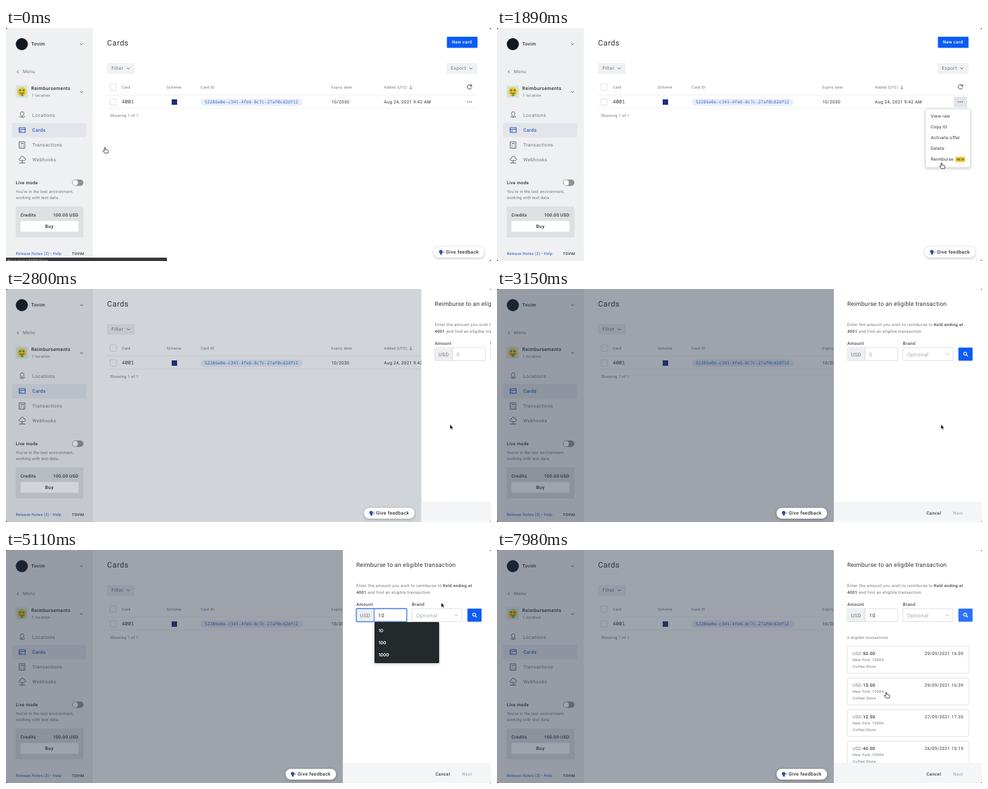
Animation, 720 px wide and 346 px high, one loop 8 s. Source, as an HTML page:

```html
<!DOCTYPE html>
<html lang="en">
<head>
<meta charset="utf-8">
<title>Reimbursement walkthrough</title>
<style>
  html, body { margin: 0; width: 100%; height: 100%; overflow: hidden; background: #111; }
  svg { display: block; width: 100vw; height: 100vh; border-radius: 3px; }
  text { font-family: Roboto, sans-serif; letter-spacing: .05em; text-rendering: geometricPrecision; white-space: pre; }
  .mono { font-family: "Noto Sans Mono", monospace; letter-spacing: 0; }
  .system { font-family: Inter, sans-serif; letter-spacing: 0; }
  .tight { letter-spacing: .03em; }
  .bold { font-weight: 500; }
  .raised { filter: drop-shadow(0 1px 2px rgba(0, 0, 0, .25)); }
  .line { fill: none; stroke-linecap: round; stroke-linejoin: round; }
</style>
</head>
<body>
<svg id="stage" viewBox="0 0 720 346" preserveAspectRatio="none"></svg>
<script>
const LOOP = 8000, STEP = 70, DRAWER = 220;
const INK = '#2d3036', GREY = '#70757d', BLUE = '#0b5cf5', LINK = '#2c5cc5';

// Drawing helpers; a text's y is the middle of its capitals.
const text = (x, y, str, size = 6.5, fill = INK, cls = '', more = '') =>
  `<text x="${x}" y="${y + size * .355}" font-size="${size}" fill="${fill}" class="${cls}" ${more}>${str}</text>`;
const rect = (x, y, w, h, fill, r = 0, more = '') =>
  `<rect x="${x}" y="${y}" width="${w}" height="${h}" rx="${r}" fill="${fill}" ${more}/>`;
const box = (x, y, w, h, r = 1, fill = '#fff', stroke = '#d5d8dc') =>
  rect(x, y, w, h, fill, r, `stroke="${stroke}" stroke-width=".8"`);
const line = (d, stroke = '#555a61', width = .9, more = '') =>
  `<path class="line" d="${d}" stroke="${stroke}" stroke-width="${width}" ${more}/>`;
const circle = (x, y, r, fill, more = '') => `<circle cx="${x}" cy="${y}" r="${r}" fill="${fill}" ${more}/>`;
const group = (id, body, more = '') => `<g id="${id}" ${more}>${body}</g>`;
const chevron = (x, y, color) => line(`M${x - 2} ${y - 1}l2 2 2-2`, color);
const magnifier = id => group(id,
  circle(695, 96, 2.2, 'none', 'stroke="#fff" stroke-width="1.1"') + line('M696.8 97.8l1.9 1.9', '#fff', 1.2));

const navIcons = [
  line('M24 131.5c-4-4-3-7 0-7s4 3 0 7M21 130.500c-4 3 10 3 6 0'),
  line('M19.500 148h9v7h-9zM19.500 150.500h9M21 153h2', LINK, 1.1),
  line('M20 169h8v9.500h-8zM22 171.500h4M22 174h.5M25.500 174h.5M22 176.500h.5M25.500 176.500h.5'),
  line('M21.500 197c-3 0-3-3.500 0-3.500 0-4 5-4 5.500-.5 3 0 2.500 4 0 4zM24 197v3M20 200.500h8'),
];

const sidebar = () => rect(0, 0, 129, 346, '#eff0f1')
  + circle(23.500, 24, 9, '#101820')
  + text(37.500, 24, 'Tovim', 7, INK, 'bold') + chevron(112, 24)
  + line('M18.500 63l-2 2 2 2') + text(25, 65, 'Menu', 6.8, GREY)
  + rect(14.500, 85.500, 18, 18, '#cfe6da', 1)
  + circle(23.500, 94.500, 6.6, '#f7c52e') + circle(21, 92.500, 1.7, '#5d8f3a') + circle(26, 92.500, 1.7, '#5d8f3a')
  + line('M20 96q3.500 2 7 0', '#7a4a12', 1.1) + rect(22, 97, 3.6, 4.200, '#66a349', 1)
  + text(37.500, 90, 'Reimbursements', 7, INK, 'bold') + text(38, 99.500, '1 location', 5.7, GREY)
  + chevron(112, 95)
  + rect(9, 141, 110, 21.500, '#e2e5e9', 2)
  + ['Locations', 'Cards', 'Transactions', 'Webhooks'].map((label, i) =>
      navIcons[i] + text(39, 129.500 + 22 * i, label, 7, i == 1 ? LINK : GREY, i == 1 ? 'bold' : '')).join('')
  + text(14.500, 229.500, 'Live mode', 6.5, INK, 'bold')
  + rect(98, 225, 17, 9.500, '#8f9297', 4.75) + circle(102.800, 229.750, 3.900, '#fff')
  + text(14.500, 243, "You're in the test environment,", 6, GREY, 'tight')
  + text(14.500, 252, 'working with test data.', 6, GREY, 'tight')
  + rect(14.500, 265, 100.500, 46, '#dee0e2', 1)
  + text(21.500, 277.500, 'Credits', 6.5, INK, 'bold')
  + text(107.500, 277.500, '100.00 USD', 6.5, INK, 'bold', 'text-anchor="end"')
  + rect(21.500, 286.500, 86, 16, '#fff', 1) + text(58, 294.500, 'Buy', 7, INK, 'bold')
  + text(14.500, 335, 'Release Notes (3) • Help', 5.9, LINK, 'tight')
  + text(98, 335, 'TOVIM', 5.4, INK, 'bold');

const softButton = (x, w, label, tip) => rect(x, 52, w, 16, '#f0f1f3', 1)
  + text(x + 6.5, 60, label, 7, GREY) + chevron(tip, 60);
const page = () => rect(129, 0, 591, 346, '#fff')
  + text(150, 22, 'Cards', 11.3, INK, '')
  + rect(654.500, 13, 45.500, 16.500, BLUE, 1) + text(662, 21, 'New card', 6.5, '#fff', 'bold')
  + softButton(150, 41, 'Filter', 181.500) + softButton(654, 46, 'Export', 690)
  + [['Card', 172], ['Scheme', 238.500], ['Card ID', 289], ['Expiry date', 483], ['Added (UTC)', 561]]
      .map(([label, x]) => text(x, 88, label, 5.6, GREY)).join('')
  + line('M601 85.500v5M599.300 89l1.700 1.700 1.700-1.700', GREY, .8)
  + line('M690.700 85.500a3.300 3.300 0 1 0 .5 3M691.200 84v2.200h-2.200', INK, .9)
  + rect(150, 99, 550, .7, '#e8eaec') + rect(150, 118.500, 550, .7, '#e8eaec')
  + box(154.500, 83, 9.500, 9.500) + box(154.500, 105, 9.500, 9.500)
  + text(172, 109.500, '4001', 7.5, INK, 'mono')
  + rect(246, 106, 8, 8, '#1c2d7c')
  + rect(289, 105, 151, 10.500, '#e8eef9', 5) + text(295, 110, '52286e0e-c341-4fe6-8c7c-27af0cd2df12', 6.43, '#3566cc', 'mono')
  + text(483, 109.500, '10/2030') + text(561, 109.500, 'Aug 24, 2021 9:42 AM')
  + group('dotsHover', rect(678, 102, 20, 15.500, '#e1e4e8', 1))
  + [685, 687.800, 690.600].map(x => circle(x, 109.700, .75, INK)).join('')
  + text(154.500, 129.500, 'Showing 1 of 1', 5.8, GREY);

const rowMenu = () => group('rowMenu', box(636.500, 120.500, 66, 86.500, 2, '#fff', '#e3e5e8')
  + ['View raw', 'Copy ID', 'Activate offer', 'Delete', 'Reimburse'].map((s, i) => text(644, 131 + 16 * i, s)).join('')
  + rect(680.500, 191, 14.500, 8.300, '#fbd34d', 1) + text(682.300, 195.200, 'NEW', 5, '#55420a', 'bold'), 'class="raised"');

const feedback = () => group('feedback', rect(635, 325, 75, 16, '#fff', 8, 'class="raised"')
  + circle(645.500, 332, 2.6, '#2d4f9e') + rect(644.500, 333, 2.800, 3.500, '#2d4f9e', .5)
  + line('M649 332l1.300-.8M649 333.500h1.300', '#2d4f9e', .7)
  + text(653, 333, 'Give feedback', 7, INK, 'bold'));

const results = () => text(520, 130, '6 eligible transactions', 5.6, GREY)
  + [['50.00', '29/09/2021 16:39'], ['15.00', '29/09/2021 16:39'], ['12.50', '27/09/2021 17:35'], ['40.00', '26/09/2021 10:19']]
    .map(([sum, date], i) => {
      const y = 143 + 47 * i;
      return box(520, y, 180, 40)
        + text(528, y + 10.5, `<tspan fill="${GREY}">USD </tspan><tspan class="bold">${sum}</tspan>`)
        + text(692.500, y + 10.5, date, 6.5, INK, '', 'text-anchor="end"')
        + text(528, y + 20.5, 'New York, 10004', 5.6, GREY) + text(528, y + 30, 'Coffee Store', 5.6, GREY);
    }).join('');

const drawer = () => group('drawer', rect(500, 0, 220, 346, '#fff')
  + text(520, 21.500, 'Reimburse to an eligible transaction', 8.7, INK, 'tight')
  + text(520, 52.500, 'Enter the amount you wish to reimburse to <tspan class="bold" fill="#3c4149">Keld ending at</tspan>', 6.1, GREY)
  + text(520, 62.500, '<tspan class="bold" fill="#3c4149">4001</tspan> and find an eligible transaction.', 6.1, GREY)
  + text(520, 80.500, 'Amount', 6.5, '#4a4f57', 'bold') + text(602.500, 80.500, 'Brand', 6.5, '#4a4f57', 'bold')
  + box(520, 87, 75, 19.500) + rect(520.400, 87.400, 26.200, 18.700, '#edeff1') + line('M546.500 87v19.500', '#d5d8dc', .8)
  + text(525.500, 97, 'USD', 7.5, GREY)
  + group('focusRing', rect(520, 87, 75, 19.500, 'none', 1, 'stroke="#4d82ea" stroke-width="1.4"')
    + line('M546.500 87v19.500', '#4d82ea', 1.200))
  + `<text id="amount" x="552.500" y="99.700" font-size="7.7"></text>`
  + box(602.500, 87, 74.500, 19.500) + text(609, 97, 'Optional', 7.7, '#a0a5ac') + chevron(668.500, 97, '#a0a5ac')
  + `<rect id="searchButton" x="685" y="87" height="19.500" rx="1"/>` + magnifier('searchIcon')
  + group('spinners', line('M520.400 120A6 6 0 0 1 529.400 117', LINK, 1.300, 'id="bigSpinner"')
    + line('M689.200 97.500A3 3 0 0 1 693.700 96', '#fff', .9, 'id="smallSpinner"'))
  + group('results', results())
  + rect(500, 316, 220, 30, '#f4f5f6')
  + text(637.500, 333, 'Cancel', 6.5, '#3c4149', 'bold') + text(677, 333, 'Next', 6.5, '#a9adb3', 'bold')
  + group('suggestions', rect(547, 107, 96, 61, '#24292b', 1.500)
    + ['10', '100', '1000'].map((s, i) => text(553, 120 + 18 * i, s, 6.500, '#fff', 'system', 'font-weight="600"')).join(''), 'class="raised"'));

const pointers = () => group('arrow', '<path d="M0 0v7.300l1.700-1.500 1.200 2.500 1.300-.6-1.200-2.400h2.300z" fill="#111" stroke="#fff" stroke-width=".6"/>')
  + group('hand', '<path d="M-.8 .8q.8-1 1.600 0v2.600l3.400.8q1 .4.800 1.600l-.7 3H-.4l-2.700-3.400q.3-1.200 1.400-.5l.9.7z" fill="#fff" stroke="#222" stroke-width=".8"/>')
  + group('beam', line('M-1.500-4.500q1.500 0 1.500 1v7q0 1-1.500 1M1.500-4.500q-1.500 0-1.500 1M0 3.500q0 1 1.500 1', '#222', .8));

const stage = document.getElementById('stage');
stage.innerHTML = page() + sidebar()
  + group('statusBar', rect(-2, 341, 241, 8, '#37383b', 1.500) + text(2, 345.800, 'devserver:4100/lists', 6.3, '#e8e8e8', 'tight'))
  + rowMenu() + rect(0, 0, 720, 346, '#283448', 0, 'id="shade"') + drawer() + feedback() + pointers();
const part = id => document.getElementById(id);

const show = (id, on) => part(id).setAttribute('display', on ? 'inline' : 'none');
const move = (id, x, y = 0) => part(id).setAttribute('transform', `translate(${x} ${y})`);
const ease = p => p < .5 ? 2 * p * p : 1 - 2 * (1 - p) ** 2;
const progress = (t, from, to) => ease(Math.min(1, Math.max(0, (t - from) / (to - from))));

// Pointer moves: start, end, x, y at the end.
const moves = [
  [0, 0, 147, 177], [70, 700, 688, 109], [1260, 1680, 660, 200], [2520, 2590, 659, 201],
  [3290, 3850, 571, 97], [4620, 5040, 646, 78], [5180, 5530, 695, 97], [6230, 6650, 674, 135], [6930, 7700, 578, 211],
];
const pointerAt = t => moves.reduce(([x, y], [from, to, nx, ny]) => {
  const p = t < from ? 0 : to > from ? progress(t, from, to) : 1;
  return [x + (nx - x) * p, y + (ny - y) * p];
}, [0, 0]);

function pointerKind(t, x, y) {
  if (t < 70) return 'hand';
  if (t < 2660) return x > 678 || t > 1050 ? 'hand' : 'arrow';
  if (t > 3500 && t < 5100 && x < 595 && y > 87 && y < 107) return 'beam';
  if (t > 5200 && t < 6020 && x > 685) return 'hand';
  return t > 7300 && y > 143 ? 'hand' : 'arrow';
}

function render(t) {
  const open = progress(t, 2640, 2970);
  const loading = t >= 6020 && t < 6860;
  const amount = t < 4340 ? '' : t < 4550 ? '1' : '10';
  const [x, y] = pointerAt(t);

  show('statusBar', t < 280);
  show('dotsHover', t >= 630 && t < 2800);
  show('rowMenu', t >= 980 && t < 2800);
  part('shade').setAttribute('opacity', .45 * open);
  move('drawer', DRAWER * (1 - open));
  move('feedback', -DRAWER * open);

  show('focusRing', t >= 3990 && t < 5880);
  show('suggestions', t >= 4340 && t < 5810);
  part('amount').textContent = amount || '0';
  part('amount').setAttribute('fill', amount ? INK : '#a0a5ac');

  part('searchButton').setAttribute('width', loading ? 32 : 21);
  part('searchButton').setAttribute('fill', loading ? '#7ea9fa' : t >= 5400 ? '#2d72f7' : BLUE);
  move('searchIcon', loading ? 11 : 0);
  show('spinners', loading);
  const turn = (t - 6720) * .45;
  part('bigSpinner').setAttribute('transform', `rotate(${turn} 526 122)`);
  part('smallSpinner').setAttribute('transform', `rotate(${turn} 692 98.500)`);
  show('results', t >= 6930);

  const kind = pointerKind(t, x, y);
  for (const id of ['arrow', 'hand', 'beam']) show(id, id === kind);
  move(kind, x, y);
}

function tick() {
  render(Math.floor(performance.now() % LOOP / STEP) * STEP);
  requestAnimationFrame(tick);
}
tick();
</script>
</body>
</html>
```
